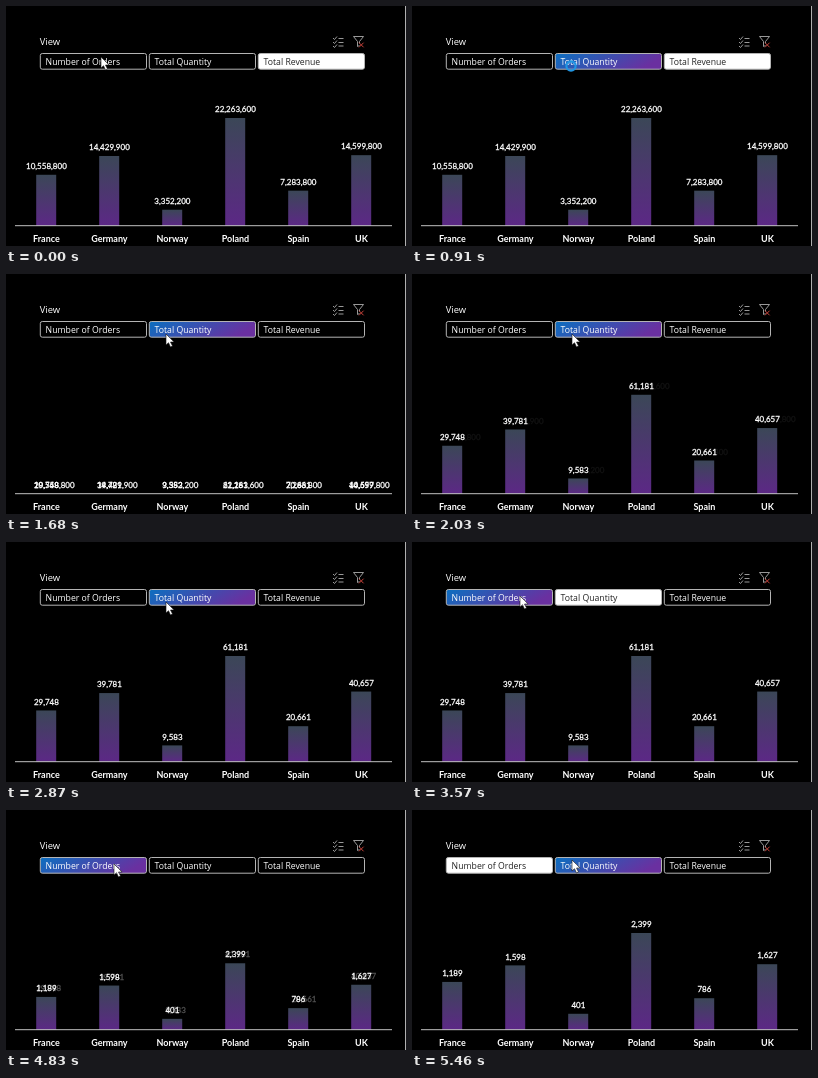
Write an HTML page that moves like this. It is 400 px wide and 240 px high and loops after 5530 ms.

```html
<!DOCTYPE html>
<html lang="en">
<head>
<meta charset="utf-8">
<title>Sales by country</title>
<style>
  html, body { margin: 0; height: 100%; overflow: hidden; background: #000; }
  svg { display: block; width: 400px; height: 240px; }
  text { fill: #fff; }
  .ui { font: 500 8.7px "Open Sans", sans-serif; }
  .view { font-size: 9.4px; }
  .value { font: 8px Lato, sans-serif; stroke: #fff; stroke-width: .3px; }
  .country { font: bold 9px Lato, sans-serif; text-anchor: middle; }
  .line { fill: none; stroke: #aaa; stroke-width: .9; }
</style>
</head>
<body>
<svg id="stage" viewBox="0 0 400 240">
  <defs>
    <linearGradient id="bar" x2="0" y2="1">
      <stop stop-color="#3b4757"/><stop offset="1" stop-color="#5c2886"/>
    </linearGradient>
    <linearGradient id="hover" y2=".25">
      <stop stop-color="#0b6fc0"/><stop offset="1" stop-color="#6a30a0"/>
    </linearGradient>
  </defs>
  <rect x="399" width="1" height="240" fill="#b0b0b0"/>
  <text class="ui view" x="33.7" y="39">View</text>
  <path class="line" d="M327 32l1.5 1.5 2.5-3M327 36l1.5 1.5 2.5-3M327 40l1.5 1.5 2.5-3M332.5 32.5h5M332.5 36.5h5M332.5 40h5"/>
  <path class="line" d="M347.5 30.5h10l-4 5v2M347.5 30.5l4 5v5l2-1"/>
  <path d="M353 36.7l4.6 4.6m0-4.6l-4.6 4.6" stroke="#c8433b"/>
</svg>
<script>
const LOOP = 5530, STEP = 70, BASE = 220;
const countries = ["France", "Germany", "Norway", "Poland", "Spain", "UK"];
const measures = [
  { name: "Number of Orders", peak: 97, values: [1189, 1598, 401, 2399, 786, 1627] },
  { name: "Total Quantity", peak: 106, values: [29748, 39781, 9583, 61181, 20661, 40657] },
  { name: "Total Revenue", peak: 108, values: [10558800, 14429900, 3352200, 22263600, 7283800, 14599800] }
];
// Bars sink until mid, then rise with the new measure until end.
const switches = [
  { from: 2, to: 1, start: 1240, mid: 1670, end: 2100 },
  { from: 1, to: 0, start: 4070, mid: 4500, end: 5030 }
];
const busyTimes = [[770, 1190], [3920, 4130]];
const path = [
  [0, 95, 51], [350, 95, 51], [700, 160, 60], [2870, 160, 60],
  [3480, 108, 54], [5110, 108, 54], [5390, 160, 50], [LOOP, 160, 50]
];

const stage = document.getElementById("stage");
function add(tag, attrs, text = "") {
  const node = document.createElementNS("http://www.w3.org/2000/svg", tag);
  set(node, attrs);
  node.textContent = text;
  return stage.appendChild(node);
}
function set(node, attrs) {
  for (const key in attrs) node.setAttribute(key, attrs[key]);
}
const lerp = (a, b, p) => a + (b - a) * p;
const ease = p => (1 - Math.cos(Math.PI * Math.min(1, Math.max(0, p)))) / 2;
const progress = (t, a, b) => ease((t - a) / (b - a));

const buttons = measures.map((m, i) => {
  const x = 34 + 109 * i;
  return {
    x,
    box: add("rect", { x: x + .3, y: 47.5, width: 106.2, height: 15.7, rx: 2, stroke: "#b4b4b4" }),
    label: add("text", { class: "ui", x: x + 5.6, y: 58.7 }, m.name)
  };
});
const columns = countries.map((name, i) => {
  const x = 30.2 + 63 * i, center = x + 10.2;
  add("text", { class: "country", x: center, y: 235.5 }, name);
  return {
    center,
    bar: add("rect", { x, width: 20, fill: "url(#bar)" }),
    labels: measures.map(m => {
      const node = add("text", { class: "value" }, m.values[i].toLocaleString("en-US"));
      return { node, left: center - node.getComputedTextLength() / 2 };
    })
  };
});
add("path", { d: "M9 219.7H386", stroke: "#c0c0c0" });
const arrow = add("path", { d: "M0 0v11l2.5-2.3 2 4.3 2-1-2-4h3.6z", fill: "#fff", stroke: "#111", "stroke-width": .6 });
const ring = add("circle", { r: 4.6, fill: "none", stroke: "#2196e3", "stroke-width": 2.2 });

function pointer(t) {
  const i = path.findIndex(key => key[0] > t);
  const [a, b] = [path[i - 1], path[i]], p = progress(t, a[0], b[0]);
  return [lerp(a[1], b[1], p), lerp(a[2], b[2], p)];
}

function draw(t) {
  const change = switches.findLast(s => t >= s.start) || { ...switches[0], to: 2 };
  const { from, to, start, mid, end } = change;
  const moving = t >= start && t < end;
  const sink = progress(t, start, mid), rise = progress(t, mid, end);
  const shown = moving && t < mid ? from : to;
  const scale = !moving ? 1 : t < mid ? 1 - sink : rise;
  const { values, peak } = measures[shown], max = Math.max(...values);

  columns.forEach(({ bar, labels }, i) => {
    const height = values[i] / max * peak * scale;
    set(bar, { y: BASE - height, height });
    labels.forEach(({ node, left }, m) => {
      let opacity = m === to ? 1 : 0, x = left;
      if (moving && m === to) opacity = sink;
      if (moving && m === from) {
        opacity = 1 - rise;
        x = lerp(left, labels[to].left, sink);
      }
      set(node, { x, y: BASE - height - 5.8, opacity });
    });
  });

  const [x, y] = pointer(t);
  buttons.forEach((button, i) => {
    const hovered = t >= STEP && x >= button.x && x < button.x + 108;
    const selected = i === to && !hovered;
    set(button.box, { fill: hovered ? "url(#hover)" : selected ? "#fff" : "#000" });
    button.label.style.fill = selected ? "#222" : "#fff";
  });

  const busy = busyTimes.some(([a, b]) => t >= a && t < b);
  set(arrow, { transform: `translate(${x} ${y})`, opacity: busy ? 0 : 1 });
  set(ring, { cx: x - 1, cy: y, opacity: busy ? 1 : 0 });
}

const began = performance.now();
function tick() {
  const t = (performance.now() - began) % LOOP;
  draw(Math.floor(t / STEP) * STEP);
  requestAnimationFrame(tick);
}
tick();
</script>
</body>
</html>
```
